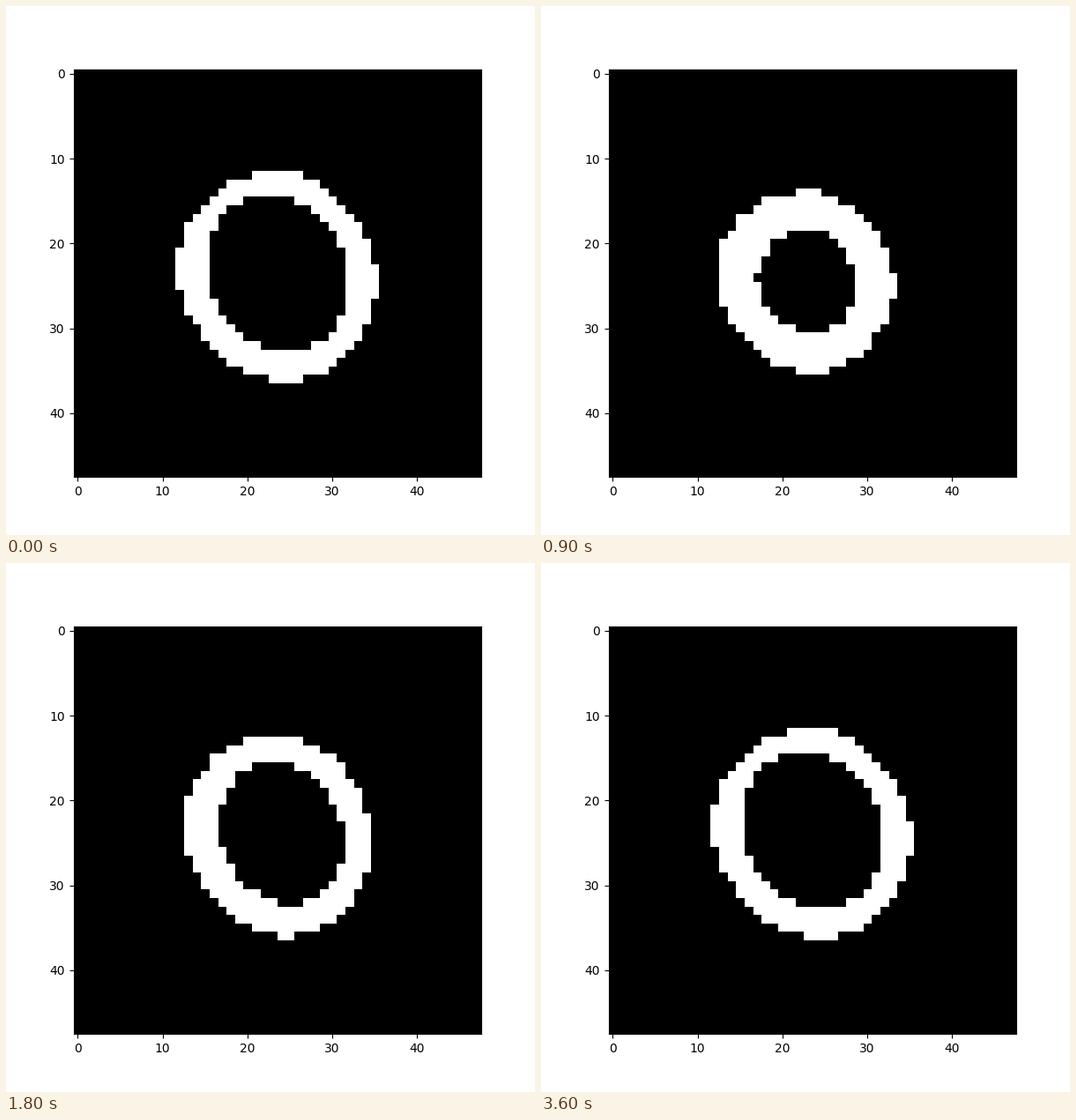
Recreate the animation shown at these times as a matplotlib script. Size 600 px wide and 600 px high, loop 3750 ms.

```python
import numpy as np
import matplotlib.pyplot as plt
from matplotlib.animation import FuncAnimation

SIZE = 48
FRAMES = 25
INTERVAL = 150

# An oval is: left, right, top, bottom, then the y of its left and right
# extremes and the x of its top and bottom extremes.
# Rows: relaxed, change when squeezed, change when swaying to the right.
WALL = np.array([
    [11.75, 35.2, 11.5, 36.35, 23, 24.7, 23.5, 24.5],
    [0.2, -2.15, 2.45, -1.1, 0.5, 0.3, -0.5, -1.2],
    [0.6, 0, 0, 0, 0, 0, 0, 0.6],
])
CAVITY = np.array([
    [15.2, 31.9, 14.3, 32.75, 22.4, 24.5, 22.1, 24.7],
    [1.55, -3.5, 4.2, -2.3, 2.1, 0.5, 0.9, -1.1],
    [0.95, 0.4, 0, 0, 0, 0, 0.3, 0.45],
])
FLAT, ROUND = 1.85, 2.0

Y, X = np.mgrid[:SIZE, :SIZE].astype(float)


def ramp(t, start, end):
    s = np.clip((t - start) / (end - start), 0, 1)
    return s * s * (3 - 2 * s)


def pulse(t, start, full, hold, end):
    """Eased rise, hold and eased fall."""
    return ramp(t, start, full) - ramp(t, hold, end)


def arc(x_end, x_side, y_side, y_end, power):
    """x of a quarter superellipse for every row."""
    u = np.clip((Y - y_side) / (y_end - y_side), 0, 1)
    return x_end + (x_side - x_end) * (1 - u ** power) ** (1 / power)


def fill(oval, lower_right):
    left, right, top, bottom, yl, yr, xt, xb = oval
    lo = np.where(Y < yl, arc(xt, left, yl, top, ROUND),
                  arc(xb, left, yl, bottom, FLAT))
    hi = np.where(Y < yr, arc(xt, right, yr, top, FLAT),
                  arc(xb, right, yr, bottom, lower_right))
    return (Y > top) & (Y < bottom) & (X >= lo) & (X < hi)


def ring(frame):
    squeeze = pulse(frame, 0, 6.5, 7, 14.5)
    sway = pulse(frame, 4, 10, 12, 21)
    mix = np.array([1, squeeze, sway])
    wall, cavity = mix @ WALL, mix @ CAVITY
    return (fill(wall, FLAT) & ~fill(cavity, ROUND)).astype(float)


fig, ax = plt.subplots(figsize=(6, 6), dpi=100)
image = ax.imshow(ring(0), cmap="gray", vmin=0, vmax=1)


def update(frame):
    image.set_data(ring(frame))
    return [image]


anim = FuncAnimation(fig, update, frames=FRAMES, interval=INTERVAL,
                     repeat=True, repeat_delay=0)
plt.show()
```
